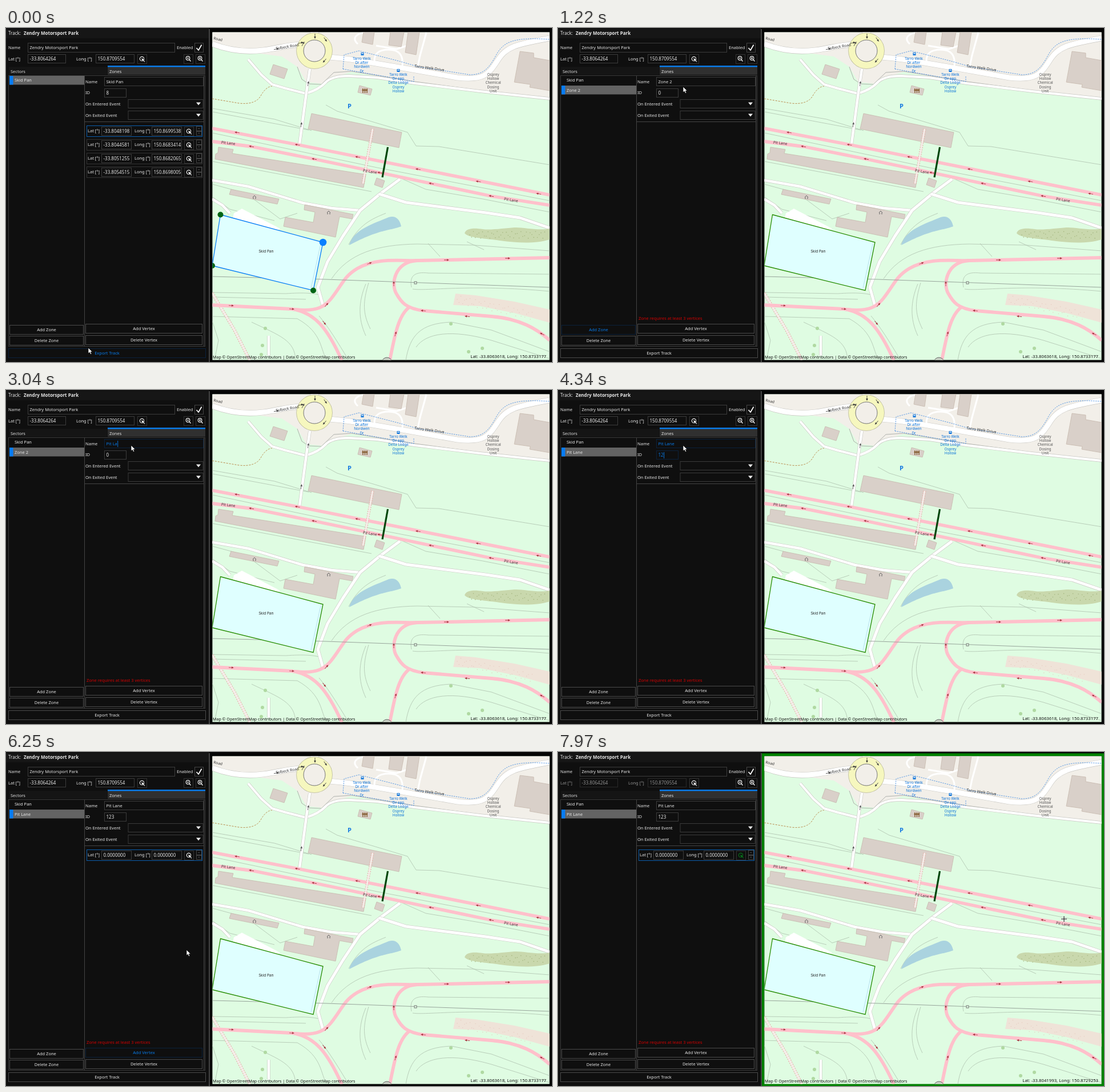
An HTML page that plays this animation: 956 by 586 pixels, repeating every 8 s.

```html
<!DOCTYPE html>
<html lang="en">
<head>
<meta charset="utf-8">
<title>Track editor</title>
<style>
html, body { margin: 0; width: 100%; height: 100%; overflow: hidden; background: #000; }
svg { display: block; width: 956px; height: 586px; font-family: "Noto Sans", "Open Sans", sans-serif; }
text { white-space: pre; }
</style>
</head>
<body>
<svg id="stage" viewBox="0 0 956 586"></svg>
<script>
const BLUE = '#087ae8', DIM_BLUE = '#0b213b', LIGHT = '#e6e6e6', EDGE = '#4a4a4a';
const LOOP = 8000;

const text = (x, y, s, o = {}) =>
  `<text x="${x}" y="${y}" font-size="${o.size || 7.5}" fill="${o.fill || LIGHT}"` +
  `${o.id ? ` id="${o.id}"` : ''} text-anchor="${o.anchor || 'start'}" font-weight="${o.weight || 400}"` +
  `${o.turn ? ` transform="rotate(${o.turn} ${x} ${y})"` : ''}>${s}</text>`;
const rect = (x, y, r, b, fill = '#0f0f0f', stroke = 'none', id = '') =>
  `<rect ${id && `id="${id}"`} x="${x}" y="${y}" width="${r - x}" height="${b - y}" fill="${fill}" stroke="${stroke}"/>`;
const line = (d, color, width = 1, extra = '') =>
  `<path d="${d}" fill="none" stroke="${color}" stroke-width="${width}" stroke-linejoin="round" ${extra}/>`;
const shape = (d, fill, stroke = 'none') => `<path d="${d}Z" fill="${fill}" stroke="${stroke}" stroke-width=".8"/>`;
const group = (id, body, extra = '') => `<g id="${id}" ${extra}>${body}</g>`;

// ---- Map ----
const road = (d, width) => line(d, '#c9c8c3', width + 1.2) + line(d, '#fff', width);
const lane = d => line(d, '#ffc0cb', 5.8);
const steps = (d, width) => line(d, '#e3aaa4', width + 2, 'stroke-dasharray="2 2"') + line(d, '#f5ece8', width);
const building = d => shape(d, '#d9d0c9', '#c6b8ad');
const contour = d => line(d, '#afc2af', .8);
const arrow = (x, y, turn, color = '#a5323c') =>
  `<path transform="translate(${x} ${y}) rotate(${turn})" d="M-4 -.4H1V-1.8L5 0L1 1.8V.4H-4Z" fill="${color}"/>`;
const label = (x, y, lines, color, size = 6.3) =>
  lines.map((s, i) => text(x, y + i * 7.2, s, { size, fill: color, anchor: 'middle' })).join('');
const house = (x, y) => line(`M${x - 3} ${y}L${x} ${y - 3}L${x + 3} ${y}M${x - 2} ${y}V${y + 3}M${x + 2} ${y}V${y + 3}`, '#555', .9);

function terrain() {
  const drive = 'M565 51C610 54 650 63 700 71L790 87C835 92 844 83 860 58S890 29 952 18';
  const ferrers = 'M361 28C390 39 420 43 450 39S490 30 515 29';
  return rect(361, 7, 952, 583, '#dffce2') +
    shape('M361 7H952V126L716 95L605 77L576 86L556 98L526 95L510 68L483 50L430 43L361 32', '#f2efe9') +
    line('M510 68L518 90L530 98L552 99L574 78L605 76L716 94L952 126', '#a8aaa5', .9) +
    [ 'M361 141L470 160L535 180', 'M361 147L530 179', 'M560 135L580 146L703 183L718 207L758 208L952 240',
      'M361 184L650 245L952 303', 'M361 234L640 287', 'M361 274L420 290L480 335L510 325',
      'M361 296L392 318L470 338', 'M690 263L735 283L835 300L952 323',
      'M600 380C618 345 640 335 665 325', 'M570 440C600 395 650 380 720 379L820 381L952 391',
      'M630 449C617 480 616 510 630 540M635 447C625 480 624 500 638 528',
      'M710 455C706 435 715 427 740 430L952 432', 'M712 458C735 462 810 449 952 462',
      'M361 464L490 466C520 464 535 465 548 468M361 472L525 476', 'M548 505C565 525 580 550 600 583',
      'M361 506L510 510C555 535 550 565 562 583M430 516C480 540 506 548 507 583',
      'M700 583C707 540 725 518 780 516L850 530L952 568', 'M718 560C735 535 780 528 850 548L952 580',
      'M739 378L760 401M807 375L837 389', 'M361 514L372 548L365 583' ].map(contour).join('') +
    line('M361 124L408 132Q437 135 446 119T466 102', '#b98a4d', 1, 'stroke-dasharray="3 2"') +
    road('M424 55L447 82L466 99L490 106L525 115Q548 108 559 96T600 84L650 87L716 97L830 111L952 124', 4.2) +
    road('M532 72L526 113L514 203', 4.5) +
    road('M361 267L424 278L520 307L570 316L620 320', 4.5) + road('M361 300L379 311L392 325', 4.5) +
    road('M690 265L655 291L620 320L590 365L563 410L546 455L555 487', 5) +
    road('M653 291L700 306L840 324L900 333L952 351', 5) + road('M460 540V575', 4) +
    shape('M399 325L413 317L480 352L475 355L397 334', '#fff') +
    road('M540 7V22', 13) + road(ferrers, 9) + road(drive, 9) +
    line('M616 28C605 18 613 10 628 8M645 61C644 45 652 38 670 38S696 47 694 67M648 31L684 37L702 31M736 8L725 48L719 77', '#fff', 3) +
    steps('M361 465L400 530L427 583', 3.5);
}

function landmarks() {
  let tufts = '', grains = '';
  for (let i = 0; i < 42; i++) {
    const x = 812 + i * 3.2;
    tufts += `<circle cx="${x}" cy="${363 + Math.sin(i * 2.4) * 6}" r=".8" fill="#a5b781"/>`;
    grains += `<circle cx="${x - 22}" cy="${476 + i * .7 + Math.sin(i * 2.4) * 7}" r=".7" fill="#e6c9bf"/>`;
  }
  return building('M468 64L493 72L487 89L462 81') +
    building('M535 150L693 183L688 210L529 177') +
    building('M372 209L398 213L396 220L630 257L626 280L366 230L367 221L371 219') +
    building('M394 283L478 300L475 309L391 292') +
    building('M523 310L608 327L606 335L584 331L577 367L486 348L489 332L538 341L541 323L522 319') +
    building('M649 263L663 268L659 280L645 275') + building('M619 101L641 107L638 118L616 113') +
    building('M626 7H645L642 29L623 25') + building('M673 7H697L692 33L670 30') + building('M704 7H724L718 47L699 43') +
    building('M900 41L924 44V52L952 57V110L917 104L918 99L890 95') +
    shape('M601 381C608 353 645 343 670 332Q687 327 692 348C672 356 656 352 601 381', '#aad3df') +
    shape('M803 360C806 350 822 351 835 353S875 351 890 350S930 356 952 352V371C930 378 900 378 865 373S810 368 803 360', '#c9d8ad') + tufts +
    shape('M787 466L822 469L890 480L952 494V517L890 500L830 488L783 486', '#efe3d8') + grains +
    [[454, 527], [449, 557], [447, 573], [779, 519], [834, 562], [810, 568]].map(([x, y]) =>
      `<circle cx="${x}" cy="${y}" r="3" fill="#b0d9a2"/>`).join('');
}

function circuit() {
  let arrows = '';
  for (let i = 0; i < 6; i++) arrows += arrow(405 + i * 105.6, 183.4 + i * 21.5, 191);
  const spots = [[430, 208, 191], [540, 230, 191], [655, 254, 191], [745, 273, 191], [850, 295, 191],
    [394, 487, 3], [500, 493, 3], [561, 486, -48], [636, 413, -22], [771, 407, 0], [878, 404, 0],
    [679, 449, -90], [731, 496, 186], [808, 506, 187], [939, 537, 208], [682, 537, -73], [557, 517, 51]];
  arrows += spots.map(s => arrow(...s)).join('');
  return lane('M361 176L512 205L952 293') + lane('M361 199L430 208L540 230L655 254L745 273L850 295L952 311') +
    lane('M361 486L500 493C548 500 560 486 570 474C590 448 592 436 615 422C650 402 690 409 720 408L771 407L952 403') +
    lane('M720 408C680 410 673 450 684 467C692 481 700 492 731 496L850 506C900 510 930 528 952 548') +
    lane('M706 490C687 504 681 538 672 583') + lane('M500 493C540 499 562 525 588 583') + arrows +
    steps('M642 177L625 273', 3) +
    line('M361 436L560 441L952 455', '#8f9b94', .9) + rect(715, 445, 719, 449, '#dffce2', '#777');
}

function mapLabels() {
  const dark = '#333', sky = '#0b72d8';
  const dashes = 'M590 72L592 47L618 40L688 58L722 68L812 82C836 82 846 70 858 48S885 15 952 20M590 72L714 94V84';
  return `<circle cx="540" cy="40" r="25" fill="none" stroke="#b8b897" stroke-width="13.5"/>
    <circle cx="540" cy="40" r="25" fill="none" stroke="#f6f7be" stroke-width="12"/>
    <circle cx="540" cy="40" r="19" fill="#f2efe9" stroke="#777"/>` +
    arrow(520, 28, -60, '#444') + arrow(558, 57, 130, '#444') + arrow(529, 98, -80, '#555') + arrow(517, 170, -80, '#555') +
    arrow(473, 37, -10, '#333') + arrow(516, 26, -12, '#333') + arrow(541, 14, 90, '#333') + arrow(559, 20, 55, '#444') +
    line(dashes, '#4a90e2', .9, 'stroke-dasharray="2.3 1.6"') +
    text(363, 20, 'Road', { size: 6.6, fill: dark, turn: 12 }) +
    text(493, 35, 'Tolbeck Road', { size: 6.6, fill: dark, anchor: 'middle', turn: -10 }) +
    text(741, 72.5, 'Tarro Welk Drive', { size: 6.8, fill: dark, anchor: 'middle', turn: 8 }) +
    rect(621.5, 43, 626.5, 48, sky) + rect(684.5, 72, 689.5, 77, sky) +
    rect(622.5, 44, 625.5, 45.5, '#fff') + rect(685.5, 73, 688.5, 74.5, '#fff') +
    label(623, 56, ['Tarro Welk', 'Dr after', 'Nordwen', 'Dr'], sky) +
    label(687, 84, ['Tarro Welk', 'Dr opp', 'Delta Lodge', 'Osprey', 'Hollow'], sky) +
    label(853, 84, ['Osprey', 'Hollow', 'Chemical', 'Dosing', 'Unit'], '#555') +
    text(601.5, 140.5, 'P', { size: 11, fill: '#1478e0', anchor: 'middle', weight: 600 }) +
    line('M625 106V114M628.5 106V114M632 106V114M623.5 109H633', '#774a18', 1.3) +
    house(435, 297) + house(565, 324) +
    text(389, 204, 'Pit Lane', { size: 6.6, fill: dark, anchor: 'middle', turn: 6 }) +
    text(637, 254, 'Pit Lane', { size: 6.6, fill: dark, anchor: 'middle', turn: 9 }) +
    text(884, 304, 'Pit Lane', { size: 6.6, fill: dark, anchor: 'middle', turn: 9 }) +
    line('M668.5 209L659 262', '#00460a', 3.2) +
    `<circle cx="667" cy="587" r="9" fill="#c9d1c5" stroke="#666"/>`;
}

function mapView() {
  const corners = [[375.5, 327.5], [361, 417], [538, 460.5]];
  return `<clipPath id="mapClip">${rect(361.4, 7.6, 951.6, 582.4)}</clipPath>` +
    rect(357, 0, 956, 586, '#050505') + rect(359, 4.8, 953.8, 584.2, 'none', '#008000', 'pickFrame') +
    `<g clip-path="url(#mapClip)">` + terrain() + landmarks() + circuit() + mapLabels() +
    `<path id="pan" d="M375.500 327.500L555 376L538 460.500L361 417Z" fill="#dfffff" stroke-width="1.3"/>` +
    line('M551 379L534 456', '#b9e2ee', 1) +
    text(455.5, 394, 'Skid Pan', { size: 6.5, fill: '#222', anchor: 'middle' }) +
    group('handles', corners.map(([x, y]) => `<circle cx="${x}" cy="${y}" r="5" fill="#006414"/>`).join('') +
      '<circle cx="555" cy="376" r="6.3" fill="#0880ff"/>') +
    text(362, 580, 'Map © OpenStreetMap contributors | Data © OpenStreetMap contributors', { size: 7.1, fill: '#111' }) +
    text(946, 579, '', { size: 7.75, fill: '#111', anchor: 'end', id: 'coords' }) + '</g>';
}

// ---- Side panel ----
const button = (id, x, y, r, b, s) =>
  rect(x + .5, y + .5, r - .5, b - .5, '#0f0f0f', EDGE, id + 'Box') +
  text((x + r) / 2, (y + b) / 2 + 2.7, s, { anchor: 'middle', id: id + 'Text' });
const field = (id, x, y, r, b, s, size = 7.5) =>
  rect(x + .5, y + .5, r - .5, b - .5, '#0f0f0f', '#3b3b3b', id + 'Box') +
  text(x + 3.5, (y + b) / 2 + 2.7, s, { size, id: id + 'Text' });
const pick = (x, y, id) => rect(x + .5, y + .5, x + 16.5, y + 16.5, '#0f0f0f', '#333') +
  group(id, `<path d="M${x + 11.7} ${y + 8}A3.7 3.7 0 1 0 ${x + 8} ${y + 11.7}" fill="none" stroke="currentColor" stroke-width="1.2"/>
  <path d="M${x + 7} ${y + 7}L${x + 13} ${y + 9.5}L${x + 10.8} ${y + 10.5}L${x + 13.5} ${y + 13}L${x + 12.7} ${y + 13.8}L${x + 10.2} ${y + 11.3}L${x + 9.2} ${y + 13}Z" fill="currentColor"/>`, 'color="#eee"');
const zoom = (x, sign) => rect(x + .5, 46.5, x + 16.5, 62.5, '#0f0f0f', '#333') +
  `<circle cx="${x + 7.5}" cy="53" r="3.3" fill="none" stroke="#eee" stroke-width="1.2"/>` +
  line(`M${x + 10} 55.5L${x + 12.5} 58.5M${x + 6} 53h3${sign}`, '#eee', 1.3);
const combo = y => rect(214, y + .5, 345, y + 15.5, '#0f0f0f', '#3b3b3b') + shape(`M333 ${y + 5.5}H341L337 ${y + 10.5}`, '#eee');

function vertexRow(i, lat, long, id) {
  const y = 171 + i * 24;
  return rect(141.5, y + .5, 343.5, y + 19.5, '#0f0f0f', i ? '#333' : '#0b5dac') +
    text(143, y + 12.3, 'Lat [°]') + field('', 167, y + 2, 220, y + 18, lat, 8) +
    text(225, y + 12.3, 'Long [°]') + field('', 255, y + 2, 308, y + 18, long, 8) + pick(312, y + 2, id) +
    rect(333.5, y + 1.5, 342.5, y + 9.5, '#0f0f0f', '#444') + rect(333.5, y + 10.5, 342.5, y + 17.5, '#0f0f0f', '#444') +
    line(`M336.500 ${y + 5.5}h2.500M336.500 ${y + 13.5}h2.500`, '#666', .8);
}

function panel() {
  const points = [['-33.8048198', '150.8699538'], ['-33.8044581', '150.8683414'],
    ['-33.8051255', '150.8682065'], ['-33.8054515', '150.8698005']];
  return rect(0, 0, 356, 586, '#0f0f0f') + rect(0, 2, 355, 18, '#161616') + rect(355, 2, 357, 586, '#444') +
    text(4, 12, 'Track:', { size: 8 }) + text(31, 12, 'Zendry Motorsport Park', { size: 8, weight: 700 }) +
    text(4, 37, 'Name') + field('', 38, 26, 296, 43, 'Zendry Motorsport Park') +
    text(299, 37, 'Enabled') + rect(330.5, 26.5, 345.5, 42.5, '#0f0f0f', '#444') + line('M333.500 35L337 39L342.500 29.500', '#fff', 1.7) +
    group('position', text(4, 57, 'Lat [°]') + field('', 38, 46, 105, 62, '-33.8064264', 8) +
      text(123, 57, 'Long [°]') + field('', 157, 46, 225, 62, '150.8709554', 8)) +
    pick(230, 46, 'trackPick') + zoom(311, '') + zoom(332, 'M339.500 51.500v3') +
    rect(5, 68, 177, 82, '#151515') + rect(178, 68, 349, 82, '#303030') + rect(178, 66, 349, 68.5, BLUE) +
    text(8, 78.5, 'Sectors') + text(181, 78.5, 'Zones') +
    rect(4.5, 83.5, 348.5, 558.5, '#0f0f0f', '#3b3b3b') + line('M137.500 84V558M346.500 84V558M138 164.500H347', '#444') +
    group('selection', rect(6, 84, 137, 99.5, '#636363') + rect(6, 84, 12.5, 99.5, '#087cf5')) +
    text(15, 94.3, 'Skid Pan') + text(15, 111.5, '', { id: 'zoneItem' }) +
    text(139, 96.5, 'Name') + field('name', 172, 86, 346, 102, '') +
    text(139, 116.3, 'ID') + field('id', 172, 106, 211, 122, '', 8) +
    text(139, 136, 'On Entered Event') + combo(125) + text(139, 156, 'On Exited Event') + combo(145) +
    group('panVertices', points.map((p, i) => vertexRow(i, ...p, 'panPick' + i)).join('')) +
    group('newVertex', vertexRow(0, '0.0000000', '0.0000000', 'newPick')) +
    text(141, 512, 'Zone requires at least 3 vertices', { fill: '#d60000', id: 'warning' }) +
    button('addZone', 6, 521, 136, 538, 'Add Zone') + button('delZone', 6, 540, 136, 557, 'Delete Zone') +
    button('addVertex', 139, 519, 344, 536, 'Add Vertex') + button('delVertex', 139, 539, 344, 556, 'Delete Vertex') +
    button('export', 4, 562, 350, 579, 'Export Track') +
    rect(0, 89, .9, 100, BLUE, 'none', 'caret');
}

const stage = document.getElementById('stage');
stage.innerHTML = rect(0, 0, 956, 586, '#000') + mapView() + panel() +
  group('pointer', '<path d="M0 0V10L2.300 7.900L4 11.500L5.800 10.700L4.200 7.200H7.300Z" fill="#fff" stroke="#000" stroke-width=".7"/>') +
  group('cross', line('M-5 0H5M0 -5V5', '#fff', 2.2) + line('M-5 0H5M0 -5V5', '#111', 1.1));
const el = id => document.getElementById(id);
el('pickFrame').setAttribute('stroke-width', 5);

// ---- Timeline ----
const ADD_ZONE = 620, NAME_FOCUS = 1500, ID_FOCUS = 3540, ADD_VERTEX = 5640, PICK = 6670, PICK_MODE = 6870;
const pointerPath = [[0, 144, 561], [60, 144, 561], [520, 86, 526], [860, 86, 526], [1220, 219, 103], [1420, 219, 97],
  [4900, 219, 97], [5400, 263, 527], [5980, 263, 527], [6250, 316, 347], [6650, 328, 185], [6770, 330, 185],
  [7060, 330, 185], [7350, 560, 232], [7670, 867, 285], [7970, 886, 293], [8000, 886, 293]];
const nameKeys = [2220, 2440, 2540, 2640, 2840, 3040, 3140, 3240];
const idKeys = [4240, 4340, 4440];

function pointerAt(t) {
  const i = pointerPath.findIndex(p => p[0] > t);
  const [t0, x0, y0] = pointerPath[i - 1], [t1, x1, y1] = pointerPath[i];
  const k = (t - t0) / (t1 - t0);
  return [x0 + (x1 - x0) * k, y0 + (y1 - y0) * k];
}
const typed = (word, keys, t) => word.slice(0, keys.filter(k => k <= t).length);
const show = (id, on) => el(id).setAttribute('display', on ? 'inline' : 'none');
const write = (id, s) => { if (el(id).textContent !== s) el(id).textContent = s; };

function accent(id, on, edge) {
  el(id + 'Box').setAttribute('stroke', on ? DIM_BLUE : edge);
  el(id + 'Text').setAttribute('fill', on ? BLUE : LIGHT);
}

function render(t) {
  const added = t >= ADD_ZONE, [x, y] = pointerAt(t);
  const nameFocus = t >= NAME_FOCUS && t < ID_FOCUS, idFocus = t >= ID_FOCUS && t < ADD_VERTEX + 100;
  const onMap = x > 361;

  accent('export', !added, EDGE);
  accent('addZone', added && t < NAME_FOCUS, EDGE);
  accent('addVertex', t >= ADD_VERTEX && t < PICK, EDGE);
  accent('name', nameFocus || (t >= ID_FOCUS && t < 4950), '#3b3b3b');
  accent('id', idFocus, '#3b3b3b');

  el('selection').setAttribute('transform', `translate(0 ${added ? 17 : 0})`);
  write('zoneItem', !added ? '' : t < ID_FOCUS ? 'Zone 2' : 'Pit Lane');
  write('nameText', !added ? 'Skid Pan' : t < 2020 ? 'Zone 2' : typed('Pit Lane', nameKeys, t));
  write('idText', !added ? '8' : t < idKeys[0] ? '0' : typed('123', idKeys, t));
  show('panVertices', !added);
  show('handles', !added);
  el('pan').setAttribute('stroke', added ? '#278c00' : '#087cf5');
  show('warning', added);
  show('newVertex', t >= ADD_VERTEX);

  const active = nameFocus ? 'nameText' : 'idText';
  show('caret', nameFocus || (t >= ID_FOCUS && t < 4040) || (t >= idKeys[0] && t < 4950));
  el('caret').setAttribute('x', 176 + el(active).getComputedTextLength());
  el('caret').setAttribute('y', nameFocus ? 89 : 109);

  show('pickFrame', t >= PICK_MODE);
  el('position').setAttribute('opacity', t >= PICK_MODE ? .6 : 1);
  el('newPick').setAttribute('color', t < PICK ? '#eee' : t < 7120 ? '#0d68c4' : '#08701a');

  show('pointer', !onMap);
  show('cross', onMap);
  el(onMap ? 'cross' : 'pointer').setAttribute('transform', `translate(${x} ${y})`);
  const lat = onMap ? -33.8041993 - (y - 293) * 7.43e-6 : -33.8063618;
  const long = onMap ? 150.8729253 + (x - 886) * 8.958e-6 : 150.8733177;
  write('coords', `Lat: ${lat.toFixed(7)}, Long: ${long.toFixed(7)}`);
}

let start;
function tick(now) {
  start ??= now;
  render((now - start) % LOOP);
  requestAnimationFrame(tick);
}
render(0);
requestAnimationFrame(tick);
</script>
</body>
</html>
```
